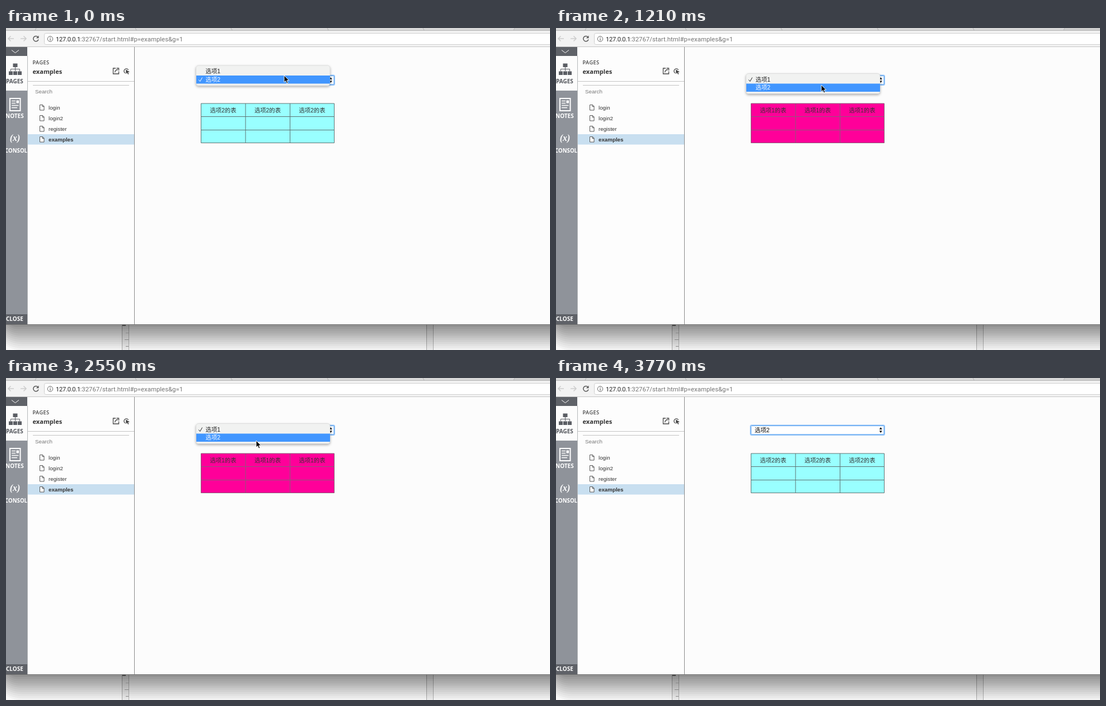
Recreate the animation shown at these times as an HTML page. Size 972 by 576 pixels, loop 4.31 s.

```html
<!DOCTYPE html>
<html lang="zh">
<head>
<meta charset="utf-8">
<title>Dropdown prototype</title>
<style>
  html, body { margin: 0; width: 100%; height: 100%; overflow: hidden; }
  svg { display: block; width: 100%; height: 100%; }
  text { font-family: "Liberation Sans", "Noto Sans CJK SC", "Noto Sans CJK", sans-serif; }
  .url { font: 11.4px Roboto, sans-serif; }
  .label { font: 700 10px "Open Sans", sans-serif; }
  .item { font-size: 9.75px; fill: #333; }
  .option { font-size: 10.4px; }
  .cell { font-size: 10.35px; fill: #333; text-anchor: middle; }
  .line { fill: none; stroke-width: 1; }
</style>
</head>
<body>
<svg viewBox="0 0 972 576">
  <defs>
    <filter id="soft" x="-10%" y="-30%" width="120%" height="180%">
      <feDropShadow dx="0" dy="2" stdDeviation="2" flood-opacity=".32"/>
    </filter>
    <clipPath id="rail"><path d="M0 34H38V531H0Z"/></clipPath>
  </defs>

  <!-- window behind, with the shadow of the browser on it -->
  <rect width="972" height="576" fill="#fafafa"/>
  <path d="M207 531H219V576H207Z M751 531H763V576H751Z" fill="#f0f0f0"/>
  <g id="shadow"></g>
  <path class="line" d="M207.5 531V576M219.5 531V576M751.5 531V576M763.5 531V576" stroke="#000" stroke-opacity=".28"/>
  <path class="line" d="M214 545.5H219M212 557.5H219M214 569.5H219" stroke="#888"/>
  <path d="M208 531H214V533H208Z" fill="#444"/>

  <!-- browser -->
  <rect width="972" height="531" fill="#fcfcfc"/>
  <rect width="972" height="34" fill="#f3f3f3"/>
  <rect width="972" height="4" fill="#d8d8d8"/>
  <path d="M909 0H972V4H907Z" fill="#cecece"/>
  <path class="line" d="M0 4.5H972M52 4L54 0M231 0L233 4M402 0L404 4M574 0L576 4M745 0L747 4M907 4L909 0" stroke="#b4b4b4"/>
  <path class="line" d="M0 33.5H972" stroke="#c6c6c6"/>
  <rect x="68.500" y="9.500" width="920" height="20" rx="3" fill="#fff" stroke="#cfcfcf"/>
  <g fill="none" stroke-width="1.5">
    <path d="M14 19H4M8.500 14.500L4 19L8.500 23.500M26 19H36M31.500 14.500L36 19L31.500 23.500" stroke="#cdcdcd"/>
    <path d="M57 16A4.700 4.700 0 1 0 58 20.500" stroke="#5c5c5c"/>
    <circle cx="79" cy="19.500" r="4.700" stroke="#666" stroke-width="1"/>
    <path d="M79 18.800V22.500M79 16.500V17.800" stroke="#666" stroke-width="1.200"/>
  </g>
  <path d="M58.500 13.500V18.200H53.800Z" fill="#5c5c5c"/>
  <text class="url" x="89" y="23.500" fill="#222" style="font-size:11px;letter-spacing:-.2px">127.0.0.1</text>
  <text class="url" x="132.500" y="23.500" fill="#757575">:32767/start.html#p=examples&amp;g=1</text>

  <!-- icon rail -->
  <g clip-path="url(#rail)">
    <path d="M0 34H38V531H0Z" fill="#8f939a"/>
    <path d="M0 34H38V50H0ZM0 512H38V531H0Z" fill="#5f6268"/>
    <path d="M0 50H38V112H0Z" fill="#fcfcfc"/>
    <path class="line" d="M10 39.500L16.500 44.500L23 39.500" stroke="#fff" stroke-width="1.300"/>
    <g fill="#5b5e64">
      <path d="M12.500 63.500H20.500V70H12.500ZM5 77.500H12V84H5ZM13 77.500H20V84H13ZM21 77.500H28V84H21Z"/>
      <path class="line" d="M16.500 70V77M8.500 77.500V73.500H24.500V77.500" stroke="#5b5e64"/>
    </g>
    <g fill="none" stroke="#fff">
      <rect x="7" y="126" width="18.500" height="22" stroke-width="2"/>
      <path d="M10 130.500H17M10 134.500H17M10 138.500H22.500M10 142.500H20" stroke-width="1.500"/>
      <path d="M18.500 132H23" stroke-width="5"/>
    </g>
    <text x="16" y="201.500" fill="#fff" text-anchor="middle" style="font:italic 700 16px 'Liberation Serif',serif">(x)</text>
    <text class="label" x="0" y="99" fill="#55585e">PAGES</text>
    <g fill="#fff">
      <text class="label" x="-1" y="161">NOTES</text>
      <text class="label" x="-2" y="223" style="font-size:9.7px">CONSOLE</text>
      <text class="label" x="0" y="524">CLOSE</text>
    </g>
  </g>

  <!-- page list -->
  <path d="M38 34H229V531H38Z" fill="#fdfdfd"/>
  <path d="M38 190H229V208.500H38Z" fill="#c8dff0"/>
  <path class="line" d="M38 95.500H229M48 102.500H220" stroke="#c4c4c4"/>
  <path class="line" d="M229.500 34V531" stroke="#8b8b8b"/>
  <path class="line" d="M38.500 50V531" stroke="#b5b7ba"/>
  <text class="label" x="47.500" y="64.500" fill="#444" style="font-size:9.2px;letter-spacing:.4px;font-weight:600">PAGES</text>
  <text class="label" x="47.500" y="81.500" fill="#333" style="font-size:11.1px">examples</text>
  <g fill="none" stroke="#444" stroke-width="1.300">
    <path d="M196 72H191.500V82H201.500V77.500M194.500 79.500C195 76 197 74.500 200 74.500M197.500 72H201.500V76"/>
    <path d="M213.500 81A4.200 4.200 0 1 1 218.700 75"/>
  </g>
  <path d="M214 74.500L221 78.500L218 79.300L219.500 82.300L218 83L216.500 80L214.500 82Z" fill="#444"/>
  <text class="item" x="52" y="117" style="fill:#777">Search</text>
  <g id="pages"></g>
  <path class="line" d="M0 530.500H972" stroke="#707070"/>

  <!-- prototype -->
  <g id="table"></g>
  <rect x="347.500" y="84.500" width="239.500" height="17.500" rx="2" fill="#fff" stroke="#9cc8f8" stroke-width="2"/>
  <rect x="348.500" y="85.500" width="237.500" height="15.500" rx="1" fill="#fff" stroke="#4d9cf0"/>
  <path d="M577.700 92L580.200 88L582.700 92ZM577.700 94.200L580.200 98.200L582.700 94.200Z" fill="#111"/>
  <text id="value" class="option" x="355" y="97"></text>
  <g id="menu">
    <rect x="339.500" width="239.500" height="36" rx="4.500" fill="#f1f2f1" stroke="#cfcfcf" stroke-width=".6" filter="url(#soft)"/>
    <rect id="highlight" x="340" width="239" height="14.500" fill="#4196ff"/>
    <text class="option" x="356.500" y="14.200">选项1</text>
    <text class="option" x="356.500" y="28.700">选项2</text>
    <path id="check" class="line" d="M344.300 0L346.700 3L350.700 -4" stroke-width="1.400"/>
  </g>
  <path id="cursor" d="M0 0V12L2.800 9.500L4.700 14L6.800 13.100L4.900 8.800H8.700Z" fill="#000" stroke="#fff" stroke-width=".9"/>
</svg>
<script>
const LOOP = 4310, ROW = 14.5;
const el = id => document.getElementById(id);
const [menu, highlight, check, value, table, cursor] =
  ["menu", "highlight", "check", "value", "table", "cursor"].map(el);
const options = menu.querySelectorAll("text");

// start ms, chosen option, highlighted row, menu opacity, pointer x, pointer y
const steps = [
  [0, 2, 2, 1, 497, 85],
  [150, 2, 1, 1, 493, 82],
  [320, 2, 0, 1, 493, 82],
  [470, 2, 1, .86, 493, 82],
  [620, 2, 0, 0, 484, 99],
  [770, 1, 0, 0, 484, 99],
  [920, 1, 2, 1, 484, 99],
  [1210, 1, 2, 1, 474, 102],
  [1360, 1, 2, 1, 460, 92],
  [1500, 1, 1, 1, 460, 92],
  [2100, 1, 0, 0, 460, 92],
  [2250, 1, 1, 1, 460, 92],
  [2400, 1, 1, 1, 458.5, 96],
  [2550, 1, 2, 1, 447, 112],
  [2700, 1, 2, 1, 446.5, 109.5],
  [2850, 1, 2, 1, 446, 109],
  [3150, 1, 2, .36, 446, 109],
  [3300, 2, 0, 0, 745, 341],
  [3450, 2, 0, 0, 920, 463],
  [3600, 2, 0, 0, 935, 492],
  [3770, 2, 0, 0, -50, -50]
];

el("shadow").innerHTML = Array.from({ length: 12 }, (_, i) =>
  `<rect x="${-2 - 2.5 * i}" y="300" width="1100" height="${235 + 3.8 * i}"
    rx="${22 + 3.5 * i}" fill-opacity="${.055 - .002 * i}"/>`).join("");

el("pages").innerHTML = ["login", "login2", "register", "examples"].map((name, i) => {
  const y = 142 + 19 * i;
  return `<path d="M60.500 ${y - 4.5}h5l2.500 2.500v7h-7.500zM65 ${y - 4.5}v3h3"
      fill="#fff" stroke="#555"/>
    <text class="item" x="76" y="${y + 3.7}" font-weight="${i === 3 ? 700 : 400}">${name}</text>`;
}).join("");

function drawTable(option) {
  const fill = option === 1 ? "#ff0099" : "#99ffff";
  const stroke = option === 1 ? "#8a5c78" : "#5f7272";
  const labels = [388, 467.5, 547].map(x =>
    `<text class="cell" x="${x}" y="150.500">选项${option}的表</text>`).join("");
  table.innerHTML = `<rect x="348.500" y="135" width="238" height="70.500" fill="${fill}"/>
    <path class="line" d="M348.500 135H586.500V205.500H348.500ZM348.500 158.500H586.500M348.500 182.500H586.500
      M428 135V205.500M507.500 135V205.500" stroke="${stroke}"/>${labels}`;
}

function show([, option, row, opacity, x, y]) {
  drawTable(option);
  value.textContent = "选项" + option;
  // The chosen row always lies over the closed box.
  menu.setAttribute("transform", `translate(0 ${option === 1 ? 81.5 : 67})`);
  menu.setAttribute("opacity", opacity);
  highlight.setAttribute("y", 3.5 + ROW * (row - 1));
  highlight.setAttribute("visibility", row ? "inherit" : "hidden");
  options.forEach((text, i) => text.setAttribute("fill", row === i + 1 ? "#fff" : "#222"));
  check.setAttribute("transform", `translate(0 ${11 + ROW * (option - 1)})`);
  check.setAttribute("stroke", row === option ? "#fff" : "#222");
  cursor.setAttribute("transform", `translate(${x} ${y})`);
}

const start = performance.now();
let current;
function tick() {
  const time = (performance.now() - start) % LOOP;
  const step = steps.findLast(s => s[0] <= time);
  if (step !== current) show(current = step);
  requestAnimationFrame(tick);
}
tick();
</script>
</body>
</html>
```
